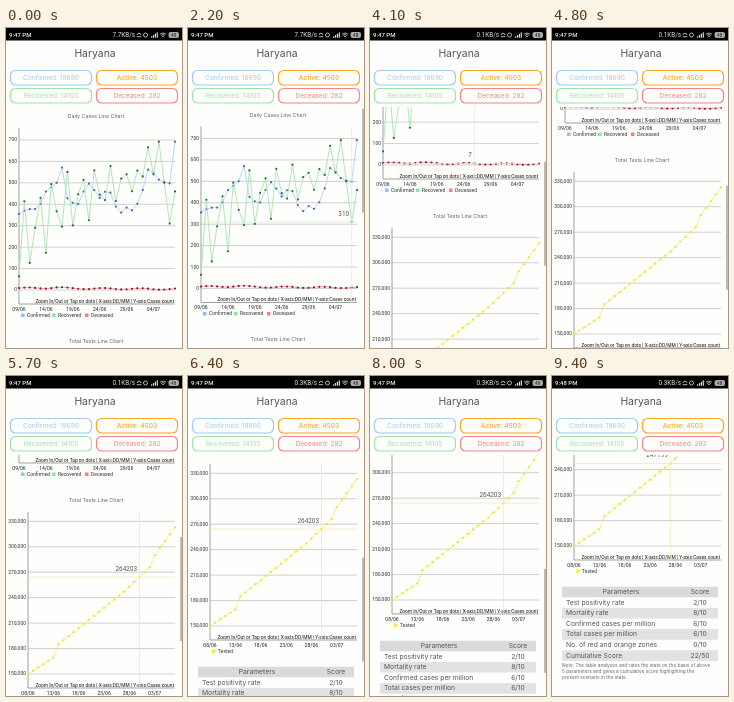
Write an HTML page with a canvas that moves like this. It is 176 by 320 pixels and loops after 10 s.

```html
<!DOCTYPE html>
<html lang="en">
<head>
<meta charset="utf-8">
<title>State dashboard</title>
<style>
html, body { margin: 0; width: 100%; height: 100%; overflow: hidden; background: #fefefc; }
canvas { display: block; width: 176px; height: 320px; }
</style>
</head>
<body>
<canvas id="stage"></canvas>
<script>
const LOOP = 10000, W = 176, H = 320, TOP = 79, DAYS = 30;
const SANS = 'Inter, sans-serif', ROBOTO = 'Roboto, sans-serif';
const canvas = document.getElementById('stage');
const ctx = canvas.getContext('2d');
const dpr = window.devicePixelRatio || 1;
canvas.width = W * dpr;
canvas.height = H * dpr;

const clamp = v => Math.min(1, Math.max(0, v));
const ramp = (t, from, to) => clamp((t - from) / (to - from));
const ease = p => p * p * (3 - 2 * p);
const daily = rule => Array.from({ length: DAYS }, (_, i) => rule(i));

// Linear interpolation through a few [x, y] points.
function track(keys, x) {
  const i = Math.max(1, keys.findIndex(k => k[0] >= x));
  const [a, u] = keys[i - 1], [b, v] = keys[i];
  return u + (v - u) * ramp(x, a, b);
}

// Each swipe: start, end, distance.
const swipes = [[1700, 2700, 3], [2900, 3900, 122], [4100, 5000, 64],
  [5700, 6400, 48], [6400, 7400, 26], [8000, 8700, 54]];
const scrollAt = t => swipes.reduce((sum, [a, b, d]) => sum + d * ease(ramp(t, a, b)), 0);
const barAt = t => [[1700, 7500], [7900, 9250]].reduce(
  (sum, [on, off]) => sum + ramp(t, on - 50, on) - ramp(t, off, off + 150), 0);

const confirmedTrend = [[0, 355], [4, 400], [8, 565], [9, 400], [14, 480], [21, 350], [24, 550], [28, 495], [29, 692]];
const recoveredTrend = [[0, 200], [6, 370], [14, 460], [23, 530], [24, 666], [25, 540], [26, 692], [28, 310], [29, 460]];
const testedTrend = [[0, 150], [5, 169.5], [6, 185], [19, 247.2], [24, 276], [25, 290], [29, 323]];

const confirmed = daily(i => track(confirmedTrend, i) + 35 * Math.sin(i * 1.6) * Math.sin(i * Math.PI / 29));
const recovered = daily(i => track(recoveredTrend, i)
  + 190 * Math.sqrt(clamp(1 - i / 23)) * Math.cos((i - 1) * 2 * Math.PI / 2.65));
const deceased = daily(i => 9 - i * .17 + 3 * Math.sin(i * .9) + 4 * Math.exp(-((i - 7) ** 2) / 3));
const tested = daily(i => track(testedTrend, i) * 1000);

const dailyChart = {
  top: 100, left: 13, zero: 262, base: 0, step: 100, gap: 21.43, count: 8, firstDay: 9,
  series: [
    { name: 'Confirmed', at: 15, data: confirmed, line: '#b4d0f5', dot: '#3d6cb4', key: '#8fc1f7' },
    { name: 'Recovered', at: 46, data: recovered, line: '#a9e4b2', dot: '#1e6b32', key: '#8ce69c' },
    { name: 'Deceased', at: 79, data: deceased, line: '#f0a0a0', dot: '#861a2a', key: '#f47d7d' }
  ]
};
const testChart = {
  top: 325, left: 22, zero: 487, base: 150000, step: 30000, gap: 25.45, count: 7, firstDay: 8, dash: [3, 1],
  series: [{ name: 'Tested', at: 24, data: tested, line: '#f6e75a', dot: '#f3df20', key: '#f5e94a' }]
};
const rows = [['Parameters', 'Score'], ['Test positivity rate', '2/10'], ['Mortality rate', '8/10'],
  ['Confirmed cases per million', '6/10'], ['Total cases per million', '6/10'],
  ['No. of red and orange zones', '0/10'], ['Cumulative Score', '22/50']];

function text(str, x, y, size, color, align = 'left', family = SANS, weight = 400) {
  ctx.font = `${weight} ${size}px ${family}`;
  ctx.textAlign = align;
  ctx.textBaseline = 'middle';
  ctx.fillStyle = color;
  ctx.fillText(str, x, y);
}

function rect(x, y, w, h, color) {
  ctx.fillStyle = color;
  ctx.fillRect(x, y, w, h);
}

function path(points, color, width, dash = []) {
  ctx.beginPath();
  points.forEach(([x, y]) => ctx.lineTo(x, y));
  ctx.strokeStyle = color;
  ctx.lineWidth = width;
  ctx.setLineDash(dash);
  ctx.stroke();
  ctx.setLineDash([]);
}

function arc(x, y, r, from, to, color) {
  ctx.beginPath();
  ctx.arc(x, y, r, from, to);
  ctx.strokeStyle = color;
  ctx.lineWidth = .8;
  ctx.stroke();
}

function drawChart(c, mark) {
  const right = 169, bottom = c.top + 176;
  const px = i => c.left + i * (right - c.left) / (DAYS - 1);
  const py = v => c.zero - (v - c.base) / c.step * c.gap;

  for (let k = 0; k < c.count; k++) {
    const v = c.base + k * c.step;
    path([[c.left, py(v)], [right, py(v)]], '#c4c4c4', .8);
    text(v.toLocaleString('en-US'), c.left - 2, py(v), 5, '#333', 'right', ROBOTO);
  }
  path([[c.left, c.top], [c.left, bottom], [right, bottom]], '#888', .8);
  for (let i = 0; i < DAYS; i += 5) {
    const date = new Date(2020, 5, c.firstDay + i).toLocaleDateString('en-GB', { day: '2-digit', month: '2-digit' });
    text(date, px(i), bottom + 5.5, 5, '#222', 'center', ROBOTO);
  }

  for (const s of c.series) {
    const points = s.data.map((v, i) => [px(i), py(v)]);
    path(points, s.line, .9, c.dash);
    ctx.fillStyle = s.dot;
    for (const [x, y] of points) {
      ctx.beginPath();
      ctx.arc(x, y, 1.1, 0, 7);
      ctx.fill();
    }
    rect(s.at, bottom + 9.5, 3.5, 3.5, s.key);
    text(s.name, s.at + 6, bottom + 11.5, 5, '#333', 'left', ROBOTO);
  }
  text('Zoom In/Out or Tap on dots | X-axis:DD/MM | Y-axis:Cases count',
    168, bottom - 2.5, 4.85, '#111', 'right', ROBOTO);

  if (mark) {
    const x = px(mark.index), y = py(mark.value);
    path([[x, c.top], [x, bottom]], mark.color, .7);
    path([[c.left, y], [right, y]], mark.color, .7);
    text(mark.value, x - 2.5, y - 8, 6.4, '#555', 'right', ROBOTO);
  }
}

function drawTable() {
  rows.forEach(([label, score], i) => {
    const y = 533 + i * 10.6, head = i === 0;
    if (i % 2 === 0) rect(10, y - 5.3, 156, 10.6, head ? '#dadada' : '#e2e2e2');
    text(label, head ? 69 : 14, y, 6.75, '#555', head ? 'center' : 'left');
    text(score, 148, y, 6.75, '#555', 'center');
  });
  ['Note: The table analyses and rates the state on the basis of above',
    '5 parameters and gives a cumulative score highlighting the',
    'present scenario in the state.'
  ].forEach((line, i) => text(line, 10, 607 + i * 6, 4.75, '#666'));
}

function drawCard(x, y, label, color, weight) {
  ctx.beginPath();
  ctx.roundRect(x + .5, y + .5, 81, 14.5, 5);
  ctx.strokeStyle = color;
  ctx.lineWidth = 1.2;
  ctx.stroke();
  text(label, x + 41, y + 8, 6.6, color, 'center', SANS, weight);
}

function drawStatus(t) {
  const ink = '#ddd';
  rect(0, 0, W, 12.5, '#000');
  text(t < 8900 ? '9:47 PM' : '9:48 PM', 3, 7, 6, '#eee', 'left', ROBOTO, 500);
  const speed = t < 3000 ? '7.7' : t < 6300 ? '0.1' : '0.3';
  text(speed + 'KB/s', 129, 7, 6.3, ink, 'right', ROBOTO);
  arc(133, 7, 1.8, Math.PI, 0, ink);
  path([[130.7, 8.7], [135.3, 8.7]], ink, .8);
  arc(139.5, 7, 2, 0, 7, ink);
  for (let i = 0; i < 4; i++) rect(145 + i * 1.9, 8.3 - i * 1.3, 1.2, 1.4 + i * 1.3, ink);
  for (const r of [1.2, 2.8, 4.4]) arc(157, 9.5, r, -Math.PI * .75, -Math.PI * .25, ink);
  ctx.beginPath();
  ctx.roundRect(162.5, 4, 10.5, 6, 2);
  ctx.fillStyle = '#aaa';
  ctx.fill();
  text('48', 167.7, 7.2, 4.6, '#222', 'center', ROBOTO);
}

function draw(t) {
  const scroll = scrollAt(t);
  ctx.setTransform(dpr, 0, 0, dpr, 0, 0);
  rect(0, 0, W, H, '#fefefc');

  ctx.save();
  ctx.beginPath();
  ctx.rect(0, TOP, W, H - TOP);
  ctx.clip();
  ctx.translate(0, -scroll);
  text('Daily Cases Line Chart', 90, 88.5, 5.3, '#666', 'center');
  drawChart(dailyChart, t < 1000 ? null : t < 2900
    ? { index: 28, value: 310, color: '#dcebdc' }
    : { index: 17, value: 7, color: '#e6e6e6' });
  text('Total Tests Line Chart', 90, 313, 5.3, '#666', 'center');
  drawChart(testChart, t < 5300 ? null : t < 8100
    ? { index: 22, value: 264203, color: '#f3eaa0' }
    : { index: 19, value: 247199, color: '#f3eaa0' });
  drawTable();
  ctx.restore();

  ctx.globalAlpha = barAt(t);
  rect(174, 80 + scroll * 136 / 317, 2, 104, '#bbb');
  ctx.globalAlpha = 1;

  drawStatus(t);
  text('Haryana', 89, 25.5, 10.4, '#555', 'center');
  drawCard(4, 42, 'Confirmed: 18690', '#a3cbf5', 400);
  drawCard(90, 42, 'Active: 4503', '#f9a825', 500);
  drawCard(4, 60, 'Recovered: 14105', '#9fe3ac', 400);
  drawCard(90, 60, 'Deceased: 282', '#f28585', 400);
}

const start = performance.now();
function frame() {
  draw((performance.now() - start) % LOOP);
  requestAnimationFrame(frame);
}
frame();
</script>
</body>
</html>
```
